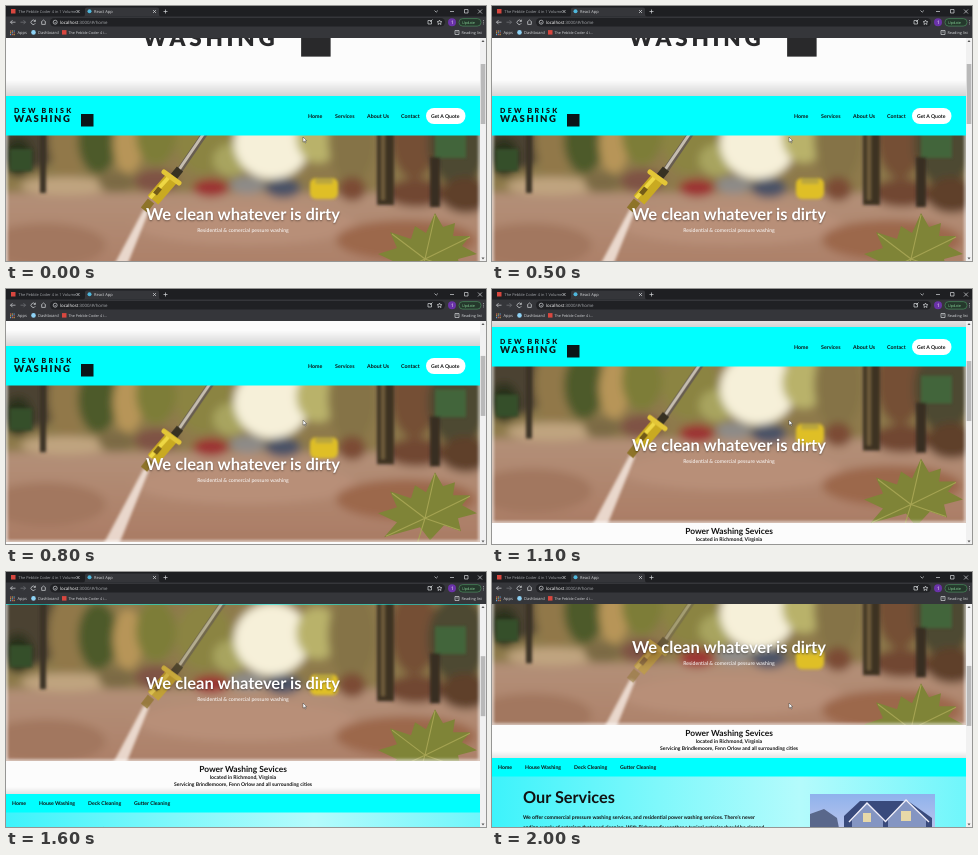
Write an HTML page that moves like this. It is 480x255 px and loops after 2.1 s.

```html
<!DOCTYPE html>
<html lang="en">
<head>
<meta charset="utf-8">
<title>Washing site scroll</title>
<style>
  html, body { margin: 0; width: 100%; height: 100%; overflow: hidden; background: #fff; }
  svg { display: block; width: 480px; height: 255px; }
  text { font-family: Lato, "Open Sans", sans-serif; font-weight: 700; text-rendering: geometricPrecision; white-space: pre; }
  .ui text { font-family: "Open Sans", "Noto Sans", sans-serif; font-weight: 400; }
</style>
</head>
<body>
<svg id="stage" viewBox="0 0 480 255" xmlns="http://www.w3.org/2000/svg"></svg>
<script>
const LOOP = 2100, STEP = 100;
const HERO = { top: 129, height: 157, width: 474 };
const PARALLAX = 0.28;

// [time in ms, vertical page offset]
const SCROLL = [[0, 0], [300, 21], [600, -11], [800, -33], [1100, -52], [1600, -97], [2000, -133]];

const rect = (x, y, w, h, fill, extra = '') =>
  `<rect x="${x}" y="${y}" width="${w}" height="${h}" fill="${fill}" ${extra}/>`;
const oval = (x, y, rx, ry, fill) =>
  `<ellipse cx="${x}" cy="${y}" rx="${rx}" ry="${ry}" fill="${fill}"/>`;
const dot = (x, y, r, fill) => oval(x, y, r, r, fill);
const shape = (d, fill, extra = '') => `<path d="${d}" fill="${fill}" ${extra}/>`;
const line = (d, color, width, extra = '') =>
  `<path d="${d}" fill="none" stroke="${color}" stroke-width="${width}" ${extra}/>`;
const label = (x, y, size, text, fill = '#111', extra = '') =>
  `<text x="${x}" y="${y}" font-size="${size}" fill="${fill}" ${extra}>${text}</text>`;
const centered = (y, size, text, fill, extra = '') =>
  label(237, y, size, text, fill, `text-anchor="middle" ${extra}`);

const defs = `<defs>
  <filter id="soft" x="-10%" y="-20%" width="120%" height="140%"><feGaussianBlur stdDeviation="4.5"/></filter>
  <filter id="mid"><feGaussianBlur stdDeviation="1.6"/></filter>
  <filter id="crisp"><feGaussianBlur stdDeviation="0.5"/></filter>
  <clipPath id="heroClip">${rect(0, 0, HERO.width, HERO.height, '#000')}</clipPath>
  <clipPath id="viewClip">${rect(0, 32, 480, 223, '#000')}</clipPath>
  <linearGradient id="shade" x2="0" y2="1">
    <stop stop-color="#000" stop-opacity="0"/><stop offset="1" stop-color="#000" stop-opacity=".16"/>
  </linearGradient>
  <linearGradient id="ground" x2="0" y2="1">
    <stop stop-color="#b39078"/><stop offset=".45" stop-color="#ad8069"/><stop offset="1" stop-color="#96674f"/>
  </linearGradient>
  <linearGradient id="aqua">
    <stop stop-color="#3df3fb"/><stop offset=".35" stop-color="#7ff8fb"/>
    <stop offset=".65" stop-color="#b4fbfc"/><stop offset="1" stop-color="#6ff6fb"/>
  </linearGradient>
  <linearGradient id="sky" x2="0" y2="1"><stop stop-color="#8fb2ec"/><stop offset="1" stop-color="#e3d5ec"/></linearGradient>
</defs>`;

function wordmark(x, y, scale, fill) {
  return `<g transform="translate(${x} ${y}) scale(${scale})">
    ${label(0, -9, 7, 'DEW BRISK', fill, 'style="font-weight:900" letter-spacing="2.3"')}
    ${label(0, 0, 9.5, 'WASHING', fill, 'style="font-weight:900" letter-spacing="1.6"')}
    ${rect(67, -8, 12.5, 12.5, fill)}</g>`;
}

function street() {
  const far = [
    [20, -5, 38, 42, '#4b4330'], [12, 22, 15, 20, '#29301c'], [62, 2, 20, 40, '#917849'],
    [92, 5, 20, 34, '#4e5a2a'], [122, 8, 15, 30, '#b79558'], [150, 0, 20, 30, '#7d7d39'],
    [198, 5, 28, 34, '#8b8443'], [225, 25, 18, 16, '#a8a45e'], [266, 8, 38, 36, '#f6f0d9'],
    [312, 2, 22, 26, '#b9b26b'], [346, 4, 24, 44, '#857346'], [408, 0, 24, 44, '#755036'],
    [452, 8, 30, 44, '#4e4a30']
  ];
  const near = [
    [60, 51, 45, 9, '#c0a47f'], [110, 47, 18, 10, '#7b6a45'], [150, 46, 22, 12, '#7f5344'],
    [205, 53, 18, 9, '#9c3130'], [242, 50, 18, 9, '#8d8b88'], [277, 53, 18, 10, '#4c5266'],
    [346, 54, 14, 12, '#7b4b36'], [410, 58, 30, 14, '#714631'], [460, 60, 26, 18, '#5e402b'],
    [40, 110, 60, 22, '#a2775f'], [240, 90, 110, 20, '#b88f78'], [400, 105, 70, 20, '#9c684c']
  ];
  return `<g filter="url(#soft)">
      ${rect(-20, -70, 520, 140, '#8e7a4c')}
      ${rect(-20, 58, 520, 160, 'url(#ground)')}
      ${[...far, ...near].map(b => oval(...b)).join('')}
    </g>
    <g filter="url(#mid)">
      ${rect(371, -50, 17, 120, '#3c3120')}${rect(375, -50, 4, 115, '#6e5c3a')}
      ${shape('M429 -5h31v28h-31z', '#42653a')}${rect(424, 22, 10, 50, '#392e20')}
      ${rect(34, -50, 6, 108, '#3b3325')}${rect(4, 14, 22, 22, '#35502a')}
      ${rect(304, 43, 28, 21, '#dfbf26', 'rx="6"')}${rect(309, 43, 18, 6, '#b9a53c', 'rx="2"')}
      ${shape('M138 74L84 175H103L143 76Z', '#f7ebe2', 'opacity=".82"')}
    </g>`;
}

function wand() {
  return `<g id="wand" filter="url(#crisp)">
    ${line('M232 -50L169 42', '#675d50', 6)}${line('M231 -50L168 42', '#c5bdb0', 3)}
    ${line('M174 34L160 51', '#373122', 8)}
    ${line('M166 43L147 65', '#c9aa21', 14)}${line('M163 42L144 63', '#eed744', 4)}
    ${line('M158 37L173 48', '#e3c637', 5, 'stroke-linecap="round"')}
    ${line('M154 53L149 59', '#735b18', 5)}
    ${line('M145 66L138 75', '#8e7429', 8)}
  </g>`;
}

function leaf() {
  return `<g filter="url(#crisp)">
    ${shape('M429 78L437 92L449 88L447 101L464 101L456 111L471 119L452 124L455 137L438 131L424 146L414 133L378 143L391 128L372 119L391 113L384 97L405 104L409 91L420 98Z', '#7f8437')}
    ${line('M429 80L419 124L464 102M419 124L386 99M419 124L380 142M419 124L454 136M419 124L405 170', '#a5a352', 1.1)}
  </g>`;
}

function hero() {
  const shadow = 'style="text-shadow:0 1px 2px rgba(0,0,0,.4)"';
  return `<g transform="translate(0 ${HERO.top})" clip-path="url(#heroClip)">
      <g id="photo">${street()}${wand()}${leaf()}</g>
      ${rect(0, -4, HERO.width, HERO.height + 4, 'none', 'stroke="#fff" stroke-width="3" opacity=".75" filter="url(#mid)"')}
    </g>
    ${centered(213.5, 16.5, 'We clean whatever is dirty', '#fff', shadow)}
    ${centered(225.7, 5.2, 'Residential &amp; comercial pessure washing', '#fff', 'style="font-weight:400"')}`;
}

function navbar() {
  const links = [[302, 'Home'], [329, 'Services'], [361, 'About Us'], [395, 'Contact']];
  return rect(0, 74, 474, 16, 'url(#shade)') + rect(0, 90, 474, 39.5, '#0ff') +
    wordmark(8, 116, 1, '#0a1618') +
    links.map(([x, text]) => label(x, 112, 5.3, text)).join('') +
    rect(420, 102, 39.5, 16, '#fff', 'rx="8"') + label(425, 111.8, 5.1, 'Get A Quote');
}

function services() {
  const links = [[6, 'Home'], [33, 'House Washing'], [82, 'Deck Cleaning'], [128, 'Gutter Cleaning']];
  return centered(297, 8.4, 'Power Washing Sevices', '#111') +
    centered(304, 5.15, 'located in Richmond, Virginia', '#111') +
    centered(311, 5.05, 'Servicing Brindlemoore, Fenn Orlow and all surrounding cities', '#111') +
    rect(0, 312, 474, 7, 'url(#shade)', 'opacity=".6"') +
    rect(0, 337, 474, 120, 'url(#aqua)') + rect(0, 319, 474, 18.5, '#0ff') +
    links.map(([x, text]) => label(x, 330, 5.2, text)).join('') +
    label(31, 364, 16.3, 'Our Services') +
    label(31, 379.5, 5.15, 'We offer commercial pressure washing services, and residential power washing services. There’s never') +
    label(31, 389.5, 5.05, 'ending supply of exteriors that need cleaning. With Richmond’s weather a typical exterior should be cleaned') +
    house();
}

function house() {
  return `<g transform="translate(318 355)">
    ${rect(0, 0, 125, 70, 'url(#sky)')}
    ${shape('M0 70V20L14 15L27 24L36 70Z', '#59678b')}
    ${shape('M34 22L50 7H98L122 24V70H34Z', '#394a7c')}
    ${shape('M42 26L57 9L73 26V70H42ZM78 26L96 6L116 26V70H78Z', '#8495c2')}
    ${line('M39 28L57 9L76 28M75 28L96 6L119 28', '#f0effa', 1.4)}
    ${rect(53, 19, 8, 9, '#e7d8a8')}${rect(91, 17, 10, 10, '#e7d8a8')}
  </g>`;
}

function browser() {
  const pale = '#d5d7da', dim = '#a5a8ac';
  const icon = d => line(d, pale, 0.7);
  return `<g class="ui">
    ${rect(0, 0, 480, 32, '#35363a')}${rect(0, 0, 480, 10.5, '#1e1f22')}
    ${shape('M77 10.5Q79 10.5 79 8V3Q79 1.5 81 1.5H151Q153 1.5 153 3V8Q153 10.5 155 10.5Z', '#35363a')}
    ${rect(5, 3, 4.5, 4.5, '#d8473f')}${label(12.5, 6.8, 3.9, 'The Pebble Coder 4 in 1 Volume', dim)}
    ${dot(83.5, 5.3, 2, '#4fb7dc')}${label(88, 6.8, 4, 'React App', pale)}
    ${icon('M70.5 4l3 3m0-3l-3 3M147 4l3 3m0-3l-3 3M157.5 5.5h4m-2-2v4')}
    ${icon('M428.5 4.5l1.7 1.7l1.7-1.7M444 5.5h4M458.5 3.5h3.5v3.5h-3.5zM472 3.5l4 4m0-4l-4 4')}
    ${rect(44, 12, 395, 8.5, '#202124', 'rx="4.2"')}
    ${icon('M9.5 16.2h-5m2-2l-2 2l2 2')}
    ${line('M14.5 16.2h5m-2-2l2 2l-2 2', '#777a7e', 0.7)}
    ${icon('M29.2 15.2a2.2 2.2 0 1 0 .1 2M29.4 13.7v1.7h-1.7M35 16.2l2.5-2.2l2.5 2.2M35.7 16v2.4h3.6V16')}
    ${icon('M47.2 16.2a2 2 0 1 0 4 0a2 2 0 1 0-4 0M49.2 16v1.2')}
    <text x="54" y="17.8" font-size="4.4" fill="#fff">localhost<tspan fill="${dim}">:3000/#/home</tspan></text>
    ${icon('M422 14.5h3.5v3.5h-3.5zM424 16l2.5-2.5M433.5 14l.7 1.6l1.7.1l-1.3 1.1l.4 1.7l-1.5-.9l-1.5.9l.4-1.7l-1.3-1.1l1.7-.1z')}
    ${dot(446, 16.2, 4, '#6a32a8')}${label(444.9, 18, 4.8, '1', '#fff')}
    ${rect(453, 12.6, 22, 7.5, '#25382c', 'rx="3.7" stroke="#4f9a63" stroke-width=".6"')}
    ${label(456, 17.7, 3.8, 'Update', '#83cf95')}${icon('M477.5 14v.8m0 1v.8m0 1v.8')}
    ${[4, 5.8, 7.6].map((x, i) => [24.5, 26.3, 28.1].map((y, j) =>
      rect(x, y, 1.1, 1.1, ['#e2675c', '#e4b746', '#68aee8'][(i + j) % 3])).join('')).join('')}
    ${label(11.5, 27.9, 4, 'Apps', pale)}
    ${dot(27.5, 26.4, 2.3, '#8ed2f5')}${label(32, 27.9, 4, 'Dashboard', pale)}
    ${rect(56, 24.1, 4.5, 4.5, '#d8473f')}${label(62.5, 27.9, 3.7, 'The Pebble Coder 4 i...', pale)}
    ${icon('M449 24.5h4v4h-4zM450.3 26h1.5')}${label(455.5, 27.9, 3.8, 'Reading list', pale)}
  </g>`;
}

function scrollbar() {
  return rect(474, 32, 6, 223, '#f1f1f1') + rect(474.7, 58, 4.6, 60, '#b9b9b9', 'id="thumb"') +
    shape('M475.5 36h3l-1.5-2zM475.5 251.5h3l-1.5 2z', '#555');
}

const stage = document.getElementById('stage');
stage.innerHTML = defs + rect(0, 0, 480, 255, '#fcfcfc') +
  `<g clip-path="url(#viewClip)"><g id="page">
    ${wordmark(137, 40, 2.36, '#29292b')}${hero()}${navbar()}${services()}
  </g></g>` + scrollbar() + browser() +
  shape('M297 131V136.2L298.3 135.1L299.2 137L300 136.6L299.2 134.8H300.8Z', '#fff', 'stroke="#222" stroke-width=".4"');

const [page, photo, wandPart, thumb] = ['page', 'photo', 'wand', 'thumb'].map(id => document.getElementById(id));

function offsetAt(time) {
  const i = SCROLL.findIndex(([end]) => end >= time);
  if (i === 0) return SCROLL[0][1];
  const [t0, y0] = SCROLL[i - 1], [t1, y1] = SCROLL[i];
  return Math.round(y0 + (y1 - y0) * (time - t0) / (t1 - t0));
}

function render(now) {
  const time = Math.floor((now % LOOP) / STEP) * STEP;
  const offset = offsetAt(time);
  page.setAttribute('transform', `translate(0 ${offset})`);
  photo.setAttribute('transform', `translate(0 ${-PARALLAX * offset})`);
  wandPart.setAttribute('opacity', Math.min(1, 1 + (offset + 60) / 130));
  thumb.setAttribute('y', 58 - 0.27 * offset);
}

function tick() {
  render(performance.now());
  requestAnimationFrame(tick);
}
tick();
</script>
</body>
</html>
```
